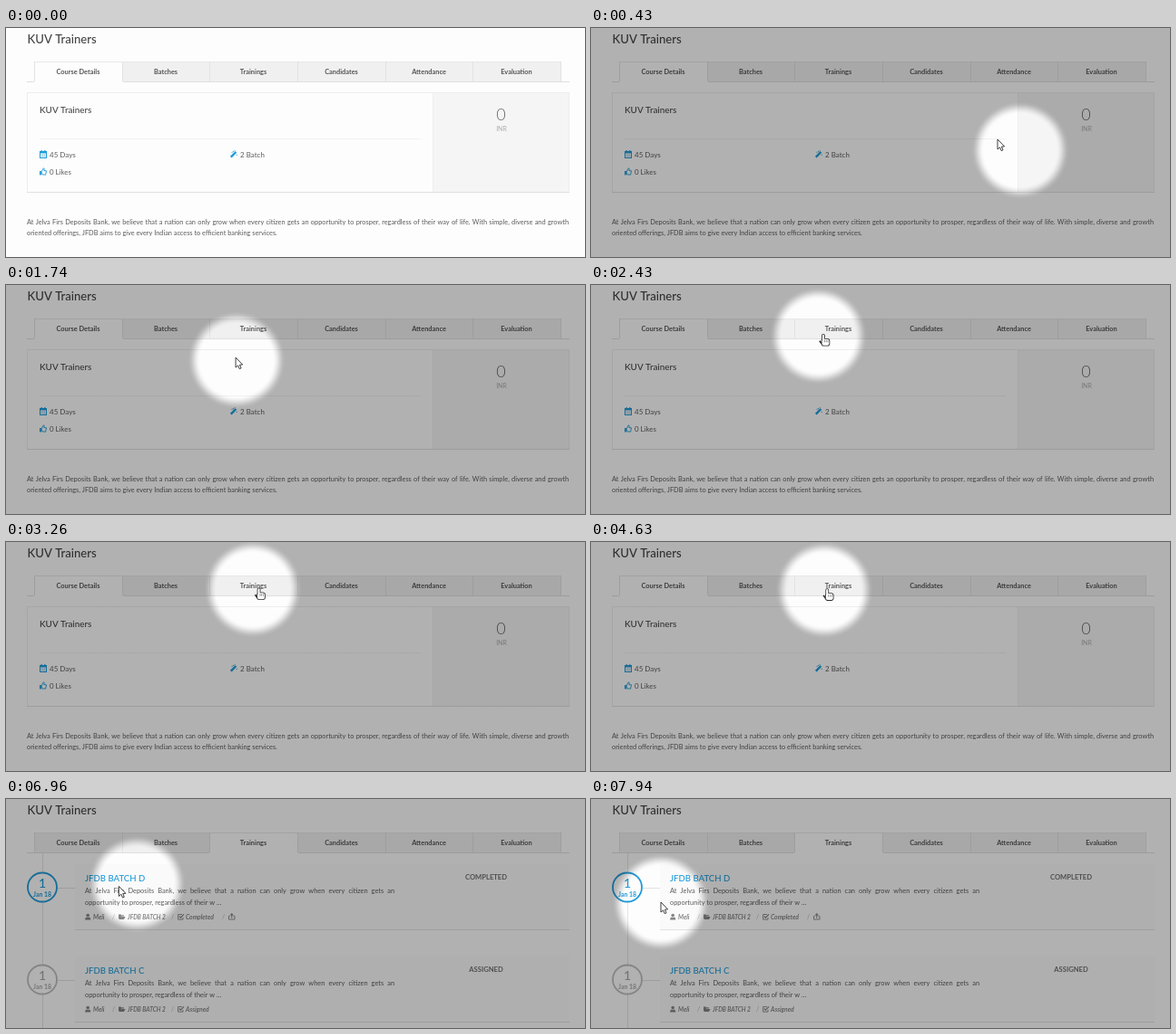
Animation of 638x253 px, one loop 8000 ms. Source, as an HTML page with a canvas:

```html
<!DOCTYPE html>
<html lang="en">
<head>
<meta charset="utf-8">
<title>Course page</title>
<style>
html, body { margin: 0; width: 100%; height: 100%; overflow: hidden; background: #fdfdfd; }
canvas { display: block; width: 638px; height: 253px; }
</style>
</head>
<body>
<canvas id="stage"></canvas>
<script>
const W = 638, H = 253, LOOP = 8000;
const BLUE = '#1f9bd8', INK = '#5c5c5c', PAGE = '#fdfdfd', LINE = '#e8e8e8';
const canvas = document.getElementById('stage');
const ctx = canvas.getContext('2d');
const dpr = window.devicePixelRatio || 1;
canvas.width = W * dpr;
canvas.height = H * dpr;

const TABS = ['Course Details', 'Batches', 'Trainings', 'Candidates', 'Attendance', 'Evaluation'];
const TAB_W = 580 / TABS.length, OPEN_TAB = 2;
const COURSE = 'KUV Trainers';
const INTRO = 'At Jelva Firs Deposits Bank, we believe that a nation can only grow when every citizen gets an';
const ITEMS = [
  { name: 'JFDB BATCH D', status: 'COMPLETED', state: 'Completed', share: true },
  { name: 'JFDB BATCH C', status: 'ASSIGNED', state: 'Assigned', share: false }
];
const ITEM_H = 102;

// The spotlight eases between these stops (time, x, y); the pointer runs a little ahead.
const STOPS = [
  [430, 473, 135], [510, 448, 123], [845, 338, 143], [1130, 169, 122], [1740, 254, 83],
  [2130, 246, 57], [3260, 272, 52], [3520, 287, 53], [4630, 257, 53],
  [6150, 276, 65], [6430, 231, 83], [7530, 48, 106], [7940, 77, 114]
];
const LEAD = 80, DIM_AT = 20, CLICK_AT = 4800, LIST_AT = 5420;

const ramp = (t, from, length) => Math.max(0, Math.min(1, (t - from) / length));
const ease = k => k * k * (3 - 2 * k);
const tabX = i => Math.round(31 + i * TAB_W);

function pathAt(t) {
  const next = STOPS.findIndex(s => s[0] > t);
  const b = STOPS.at(next), a = STOPS[Math.max(0, next - 1)];
  if (next < 1) return { x: b[1], y: b[2] };
  const k = ease((t - a[0]) / (b[0] - a[0]));
  return { x: a[1] + (b[1] - a[1]) * k, y: a[2] + (b[2] - a[2]) * k };
}

function text(str, x, y, size, color = INK, style = '', align = 'left') {
  ctx.font = `${style} ${size}px Lato, sans-serif`;
  ctx.textAlign = align;
  ctx.fillStyle = color;
  ctx.fillText(str, x, y);
}

function justify(str, x, y, size, width) {
  const words = str.split(' ');
  ctx.font = `${size}px Lato, sans-serif`;
  const sizes = words.map(w => ctx.measureText(w).width);
  const gap = (width - sizes.reduce((s, w) => s + w, 0)) / (words.length - 1);
  words.forEach((w, i) => {
    text(w, x, y, size);
    x += sizes[i] + gap;
  });
}

function rect(x, y, w, h, color) {
  ctx.fillStyle = color;
  ctx.fillRect(x, y, w, h);
}

function frame(x, y, w, h, color) {
  ctx.strokeStyle = color;
  ctx.lineWidth = 1;
  ctx.strokeRect(x + .5, y + .5, w - 1, h - 1);
}

function poly(points, fill, stroke, width = 1, close = true) {
  ctx.beginPath();
  points.forEach(([x, y]) => ctx.lineTo(x, y));
  if (close) ctx.closePath();
  if (fill) { ctx.fillStyle = fill; ctx.fill(); }
  if (stroke) { ctx.strokeStyle = stroke; ctx.lineWidth = width; ctx.stroke(); }
}

function disc(x, y, r, fill, stroke, width) {
  ctx.beginPath();
  ctx.arc(x, y, r, 0, Math.PI * 2);
  ctx.fillStyle = fill;
  ctx.fill();
  if (stroke) { ctx.strokeStyle = stroke; ctx.lineWidth = width; ctx.stroke(); }
}

function at(x, y, draw) {
  ctx.save();
  ctx.translate(x, y);
  draw();
  ctx.restore();
}

function calendarIcon() {
  frame(0, 1, 8, 8, BLUE);
  rect(0, 1, 8, 2.4, BLUE);
  for (let i = 0; i < 6; i++) rect(1.7 + i % 3 * 1.7, 4.3 + (i > 2) * 1.8, 1.2, 1.2, '#7cc3e6');
  for (const x of [1.6, 5.2]) rect(x, 0, 1.2, 2, BLUE);
}

function thumbIcon() {
  rect(0, 4, 1.8, 4.4, BLUE);
  poly([[2.4, 4.2], [4.4, .8], [5.2, 1.4], [4.9, 3.6], [7.5, 3.8], [6.6, 8.2], [2.4, 7.8]],
    null, BLUE, .9);
}

function wandIcon() {
  poly([[.8, 7.6], [6.4, 2]], null, BLUE, 2.4, false);
  for (let i = 0; i < 3; i++) rect(1.6 + i * 1.5, 1.8 - i * .8, 1, 1, BLUE);
  rect(6.8, 4.8, 1, 1, BLUE);
}

function userIcon(color) {
  disc(3.2, 2, 1.8, color);
  poly([[0, 7], [.8, 4.2], [5.6, 4.2], [6.4, 7]], color);
}

function folderIcon(color) {
  rect(0, 1, 2.8, 4.6, color);
  rect(0, 1.8, 6, 1.2, color);
  poly([[1.9, 3.5], [7.6, 3.5], [6, 6.6], [.3, 6.6]], color);
}

function checkIcon(color) {
  poly([[5, 1], [.6, 1], [.6, 6.6], [6, 6.6], [6, 4.4]], null, color, .9, false);
  poly([[1.8, 3], [3.4, 4.6], [7, .9]], null, color, 1.3, false);
}

function shareIcon(color) {
  poly([[1.8, 3.4], [.5, 3.4], [.5, 7], [7, 7], [7, 3.4], [5.7, 3.4]], null, color, .9, false);
  poly([[3.75, 0], [6, 2.6], [1.5, 2.6]], color);
  rect(3.2, 2, 1.1, 3.6, color);
}

function drawTabs(active) {
  text(COURSE, 23.5, 16.5, 13.1, '#444', '500');
  rect(23, 59, 598, 1, '#e0e0e0');
  TABS.forEach((label, i) => {
    const x = tabX(i), w = tabX(i + 1) - x + 1, on = i === active;
    rect(x, 37, w, on ? 23 : 22, on ? PAGE : '#f0f0f0');
    rect(x, 37, w, 1, LINE);
    rect(x, 37, 1, 22, '#e2e2e2');
    rect(x + w - 1, 37, 1, 22, '#e2e2e2');
    text(label, x + w / 2 - .5, 51.2, 7.4, '#555', 'bold', 'center');
  });
}

function drawCourse() {
  rect(471, 71, 150, 111, '#f5f5f5');
  frame(23, 71, 598, 111, '#ededed');
  rect(23, 181, 598, 1, '#e0e0e0');
  rect(470, 72, 1, 109, '#efefef');
  rect(37, 122, 420, 1, '#f1f1f1');
  text(COURSE, 37, 94, 9.9, '#484848', '500');
  at(37, 135, calendarIcon);
  at(37, 154, thumbIcon);
  at(247, 135, wandIcon);
  text('45 Days', 48, 142.7, 8);
  text('0 Likes', 48, 161.5, 7.9);
  text('2 Batch', 258, 142.7, 8);
  text('0', 545.5, 102, 18, '#666', '300', 'center');
  text('INR', 546, 114, 7, '#acacac', '', 'center');
  justify(INTRO + ' opportunity to prosper, regardless of their way of life. With simple, diverse and growth',
    23, 216.5, 7.4, 597);
  text('oriented offerings, JFDB aims to give every Indian access to efficient banking services.',
    23, 229.3, 7.35);
}

function drawItem(item, hover) {
  const tone = hover ? BLUE : '#a6a6a6', meta = '#858585', slant = 'italic bold';
  rect(76, 72, 545, 73, '#fafafa');
  rect(76, 144, 545, 1, '#e2e2e2');
  rect(57, 98, 19, 1, '#e0e0e0');
  disc(40, 97.5, 16, PAGE, hover ? BLUE : '#bdbdbd', 1.8);
  text('1', 40, 98, 14, tone, '500', 'center');
  text('Jan 18', 40, 107.5, 6.9, tone, 'bold', 'center');
  text(item.name, 87, 91, 9.6, BLUE, '500');
  text(item.status, 529, 88.5, 7.6, '#707070', 'bold', 'center');
  justify(INTRO, 87, 104, 7.4, 341);
  text('opportunity to prosper, regardless of their w ...', 87, 117, 7.4);
  at(87, 126.5, () => userIcon(meta));
  text('Meli', 96, 133, 6.8, meta, slant);
  text('/', 117, 133, 7, '#b5b5b5');
  at(124, 126.5, () => folderIcon(meta));
  text('JFDB BATCH 2', 134, 133, 6.6, meta, slant);
  text('/', 182, 133, 7, '#b5b5b5');
  at(189, 126.5, () => checkIcon(meta));
  text(item.state, 198, 133, 6.8, meta, slant);
  if (!item.share) return;
  text('/', 238, 133, 7, '#b5b5b5');
  at(245, 126, () => shareIcon(meta));
}

function drawTrainings(pointer) {
  rect(40, 60, 1, 193, '#e4e4e4');
  ITEMS.forEach((item, i) => {
    const y = pointer.y - i * ITEM_H;
    at(0, i * ITEM_H, () => drawItem(item, y > 72 && y < 145));
  });
}

function drawShade({ x, y }, r, alpha) {
  const core = .74, steps = 8;
  const glow = ctx.createRadialGradient(x, y, 0, x, y, r);
  for (let i = 0; i <= steps; i++) {
    const k = i / steps;
    glow.addColorStop(core + (1 - core) * k, `rgba(0,0,0,${alpha * ease(k)})`);
  }
  rect(0, 0, W, H, glow);
}

function arrow() {
  poly([[0, 0], [0, 11], [2.5, 8.8], [4.2, 12.6], [6, 11.8], [4.4, 8.1], [7.6, 7.9]],
    '#fff', '#2a2a2a', .9);
}

function hand() {
  ctx.beginPath();
  ctx.roundRect(2, -1, 2.2, 9, 1.1);
  ctx.roundRect(1.6, 4, 8, 7, 2);
  ctx.moveTo(2, 10);
  ctx.lineTo(-1, 6);
  ctx.strokeStyle = '#2a2a2a';
  ctx.lineWidth = 1.6;
  ctx.stroke();
  ctx.fillStyle = '#fff';
  ctx.fill();
  for (let i = 0; i < 3; i++) rect(4.2 + i * 1.8, 5, .6, 2.6, '#555');
}

function faded(alpha, draw) {
  if (alpha <= 0) return;
  ctx.globalAlpha = alpha;
  draw();
  ctx.globalAlpha = 1;
}

function render(t) {
  const pointer = pathAt(t + LEAD);
  const open = t >= CLICK_AT;
  ctx.setTransform(dpr, 0, 0, dpr, 0, 0);
  rect(0, 0, W, H, PAGE);
  faded(1 - ramp(t, CLICK_AT, 200), drawCourse);
  faded(ramp(t, LIST_AT, 200), () => drawTrainings(pointer));
  drawTabs(open ? OPEN_TAB : 0);
  if (t < DIM_AT) return;

  const k = ramp(t, DIM_AT, 400);
  drawShade(pathAt(t), 54 + 90 * (1 - k), .3 * k);
  const overTab = pointer.y > 37 && pointer.y < 60 &&
    pointer.x > tabX(OPEN_TAB) && pointer.x < tabX(OPEN_TAB + 1);
  at(pointer.x, pointer.y, overTab ? hand : arrow);
}

const start = performance.now();
function tick() {
  render((performance.now() - start) % LOOP);
  requestAnimationFrame(tick);
}
tick();
</script>
</body>
</html>
```
